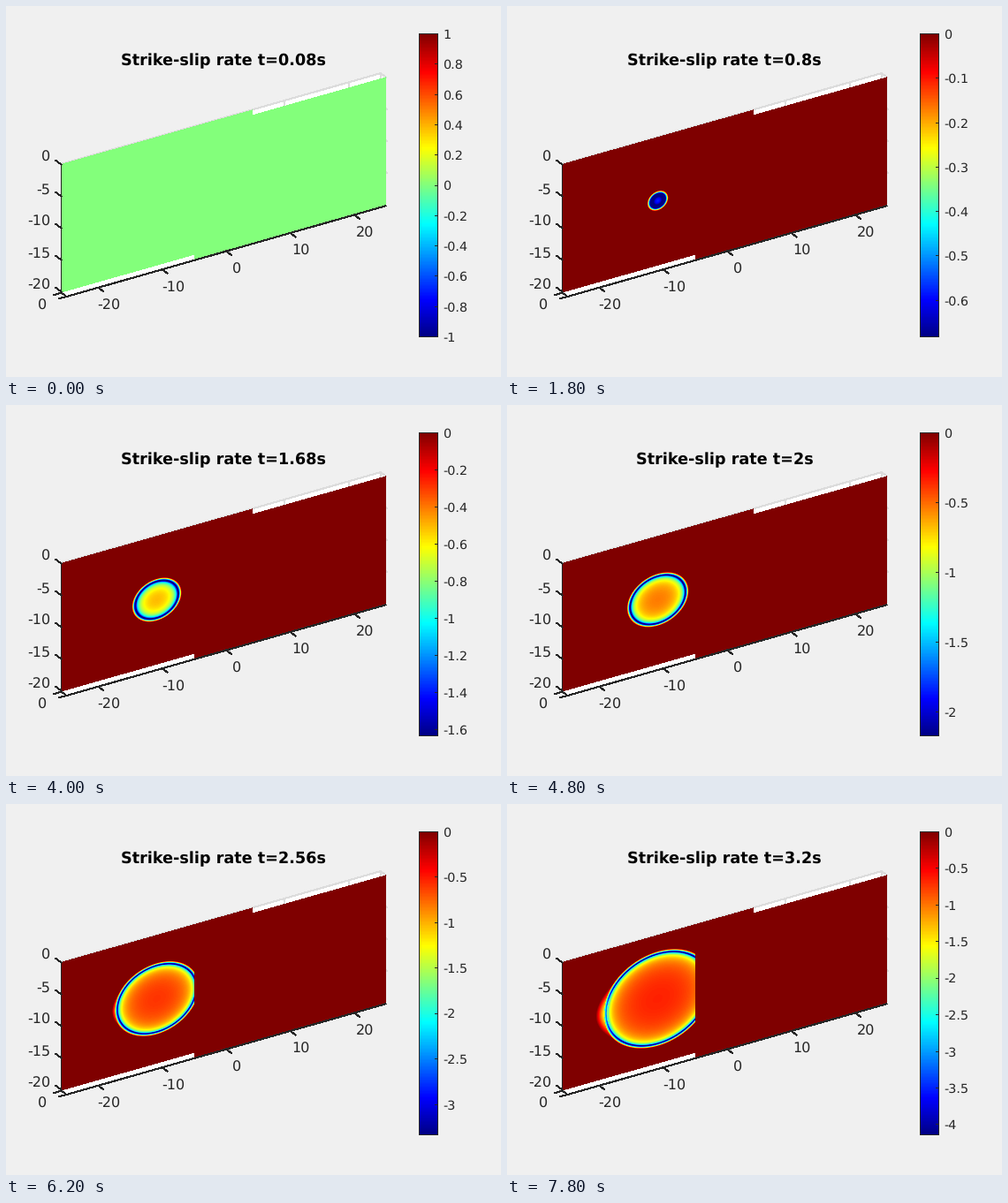
Write a matplotlib script that moves like this. It is 560x420 px and loops after 8000 ms.

```python
import math

import numpy as np
import matplotlib.pyplot as plt
from matplotlib.animation import FuncAnimation
from matplotlib.colors import ListedColormap

W, H, DPI = 560, 420, 100
FRAMES, STEP_MS, DT = 40, 200, 0.08
INK, GRID = "#262626", "#dcdcdc"
SLOPE = 103 / 362             # screen slope of the strike axis
DEPTH = 145.7                 # screen height of a fault plane
BAR = (467, 489, 31, 375)     # left, right, top, bottom of the colorbar

# Key times with rupture half-axes (px) and peak slip rate
T_KEYS = (0.08, 0.4, 1.2, 1.68, 2.24, 2.56, 3.2)
A_KEYS = (0, 4.2, 18.6, 27.5, 39.5, 47.5, 61.5)
B_KEYS = (0, 4.1, 17.1, 23.4, 33.5, 40, 53.2)
PEAK_T = (0.08, 0.4, 0.72, 0.96, 1.04, 1.12, 1.2, 1.44, 1.68, 1.92, 2.24, 2.56, 2.96, 3.2)
PEAK_V = (0, 0.389, 0.614, 0.818, 0.85, 0.893, 0.973, 1.27, 1.631, 2.012, 2.65, 3.335, 4.05, 4.139)

plt.rcParams["text.hinting"] = "none"


def jet_map(n=256):
    x = np.arange(1, n + 1) / n
    return ListedColormap(np.clip([1.5 - abs(4 * x - k) for k in (3, 2, 1)], 0, 1).T)


JET = jet_map()

fig = plt.figure(figsize=(W / DPI, H / DPI), dpi=DPI, facecolor="#f0f0f0")
ax = fig.add_axes([0, 0, 1, 1])
ax.set_axis_off()


def label(x, y, text, px, ha="center", **kw):
    """Digits centred vertically on y."""
    kw.setdefault("color", INK)
    return ax.text(x, y + 0.365 * px, text, fontsize=px * 72 / DPI, ha=ha,
                   va="baseline", family="DejaVu Sans", **kw)


def line(x0, y0, x1, y1, color=INK, z=4):
    """Crisp one-pixel line; integer + 0.5 is a pixel centre."""
    return ax.plot([x0, x1], [y0, y1], color=color, lw=72 / DPI, zorder=z,
                   antialiased=False, snap=False, solid_capstyle="projecting")[0]


# Pixel grid covering both fault planes
X0, X1, Y0, Y1 = 63, 430, 70, 335
px, py = np.meshgrid(np.arange(X0, X1) + 0.5, np.arange(Y0, Y1) + 0.5)
top = 179 - SLOPE * (px - 62)
base = 226 + SLOPE * (430 - px)
back = (px < 279) & (py >= top) & (py < top + DEPTH)
front = (px >= 213) & (py >= base - DEPTH) & (py < base)
planes = back | front
dx = px - 170.6
dy = py - 220.4 + SLOPE * dx


def slip_rate(t, peak):
    """Magnitude of slip rate: an expanding elliptical crack with a sharp front."""
    a = np.interp(t, T_KEYS, A_KEYS)
    b = np.interp(t, T_KEYS, B_KEYS)
    if a <= 0:
        return np.zeros_like(px)
    size = math.sqrt(a * b)
    q = np.hypot(dx / a, dy / b) + 1e-9
    r = q * size
    fall = min(3, 0.6 * size)
    tip = size - 0.8 * fall
    core = 0.48 + 0.1 * max(0, t - 1.4) + 0.3 * max(0, 1.4 - t)
    core = min(core, 0.85 * peak)

    inside = core / np.sqrt(np.clip(1 - (r / tip) ** 2, 1e-6, 1))
    ring = peak * np.clip(1 - (r - tip) / fall, 0, 1)
    v = np.where(r <= tip, np.minimum(inside, peak), ring)

    # Forerunner along strike that weakens the front behind it
    grow = min(max((t - 2.1) / 1.1, 0), 1)
    along = (dx / a / q) ** 8
    v = np.where(v > 0.6 * peak, v * (1 - 0.25 * grow ** 2 * along), v)
    reach = 9 * grow * along + 1e-6
    foot = 0.4 * peak * min(1, 2 * grow) * along * np.clip(1 - (r - size + 1) / reach, 0, 1)
    v = np.where(r > tip, np.maximum(v, foot), v)
    return np.where(front, 0, v)


# White axes box with faint grid
ax.fill([62, 424, 430, 430, 68, 62], [179, 76, 81, 226, 329, 324],
        color="white", lw=0, zorder=1, antialiased=False)
line(62, 179, 424, 76, GRID, 2)
line(424, 76, 430, 81, GRID, 2)
for gx in (315.4, 387.8, 424):
    gy = 179 - SLOPE * (gx - 62)
    line(gx, gy, gx, gy + 40, GRID, 2)
for k in (1, 2, 3):
    line(424, 76 + 36 * k, 430.5, 81 + 36 * k, GRID, 2)

field = ax.imshow(np.zeros(px.shape + (4,)), extent=(X0, X1, Y1, Y0),
                  interpolation="nearest", zorder=3)

# Axis lines, ticks and tick labels
line(62.5, 179.5, 62.5, 324.5)
line(62.5, 324.5, 68.5, 329)
line(68.5, 329, 429.5, 226.3)
line(62.5, 324.5, 54.5, 327)
line(68.5, 329, 60.5, 331)
label(41.5, 338, "0", 16)
for k in range(5):
    y = 179.5 + 36 * k
    line(62.5, y, 56.5, y - 4.5)
    label(50, 170.3 + 36.2 * k, f"{-5 * k}", 16, ha="right")
    x = 104.2 + 72.4 * k
    y = 329 - SLOPE * (x - 68)
    line(x, y, x + 6, y + 4.5)
    label(x + 12.5, y + 19.5, f"{10 * k - 20}", 16)

title = label(246, 60.6, "", 17.6, weight="bold", color="black")

# Colorbar
left, right, upper, lower = BAR
ax.imshow(np.arange(255, -1, -1)[:, None], cmap=JET, vmin=0, vmax=255,
          extent=(left, right, lower, upper), interpolation="nearest", zorder=3)
for x in (left + 0.5, right - 0.5):
    line(x, upper + 0.5, x, lower - 0.5, z=5)
for y in (upper + 0.5, lower - 0.5):
    line(left + 0.5, y, right - 0.5, y, z=5)
bar_text = [label(494, 0, "", 14.4, ha="left") for _ in range(12)]
bar_tick = [line(right - 3.5, 0, right - 0.5, 0, z=5) for _ in range(12)]

ax.set_xlim(0, W)
ax.set_ylim(H, 0)
ax.set_aspect("auto")


def nice_step(span):
    unit = 10.0 ** math.floor(math.log10(span) - 1)
    return next(unit * k for k in (1, 2, 5, 10, 20) if span / (unit * k) <= 10.001)


def set_scale(low, high):
    step = nice_step(high - low)
    for i, (text, tick) in enumerate(zip(bar_text, bar_tick)):
        value = round(high - i * step, 6)
        shown = value >= low - 1e-6
        text.set_visible(shown)
        tick.set_visible(shown)
        y = upper + 0.5 + (high - value) / (high - low) * (lower - upper - 1)
        text.set_y(y + 0.365 * 14.4)
        text.set_text(f"{value + 0.0:g}")
        tick.set_ydata([math.floor(y) + 0.5] * 2)


def draw(n):
    t = round(DT * (n + 1), 2)
    peak = float(np.interp(t, PEAK_T, PEAK_V))
    low, high = (-peak, 0) if peak > 0 else (-1, 1)
    level = (-slip_rate(t, peak) - low) / (high - low)
    rgba = JET(np.clip((level * 256).astype(int), 0, 255))
    rgba[..., 3] = planes
    field.set_data(rgba)
    title.set_text(f"Strike-slip rate t={t:g}s")
    set_scale(low, high)
    return [field, title, *bar_text, *bar_tick]


anim = FuncAnimation(fig, draw, frames=FRAMES, init_func=lambda: draw(0),
                     interval=STEP_MS, repeat=True, repeat_delay=0, blit=False)
plt.show()
```
